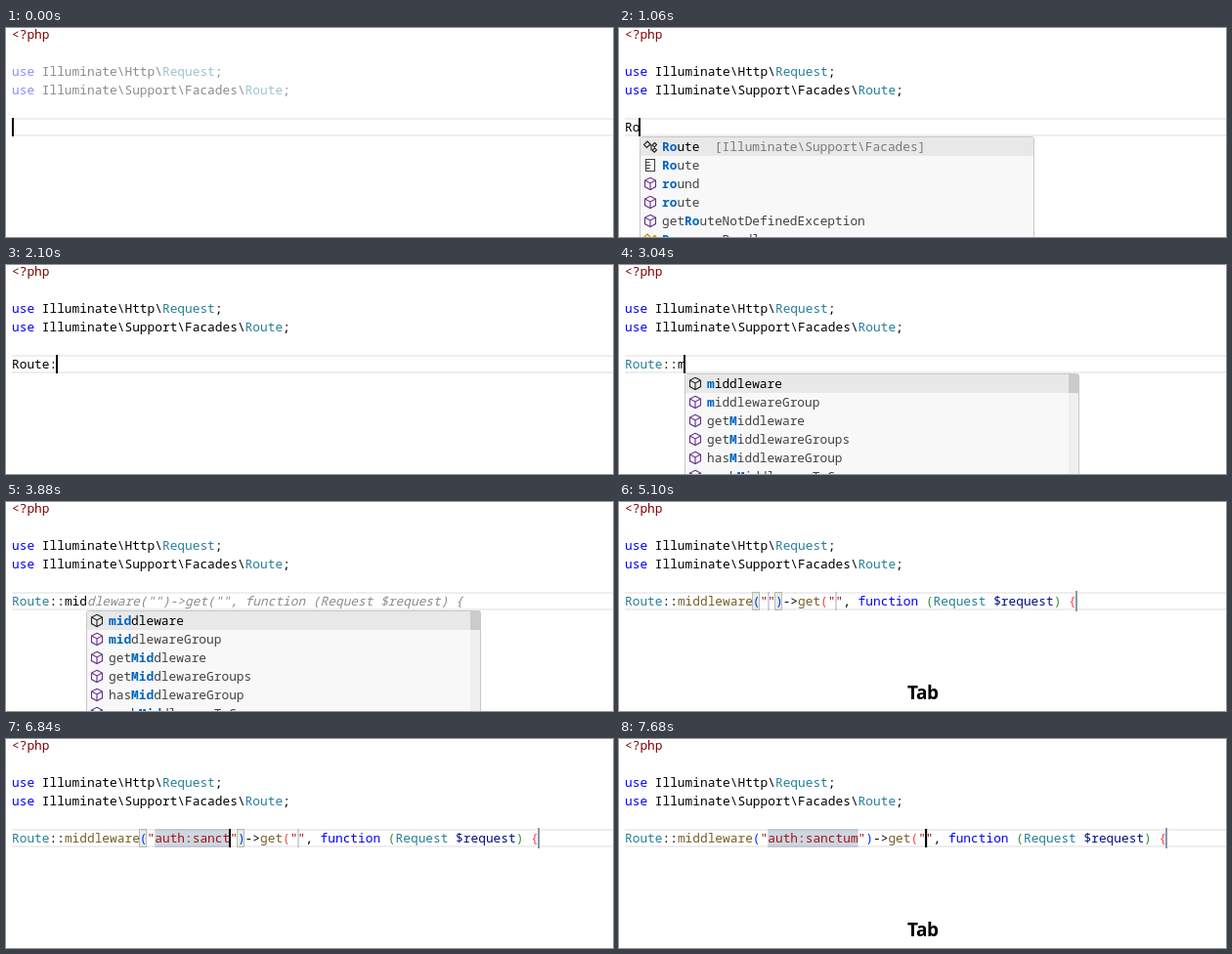
Animation of 621x214 px, one loop 8000 ms. Source, as an HTML page:

```html
<!DOCTYPE html>
<html lang="en">
<head>
<meta charset="utf-8">
<style>
html, body { margin: 0; width: 100%; height: 100%; overflow: hidden; background: #fff; }
svg { display: block; width: 621px; height: 214px; overflow: hidden; }
text { font: 12.83px "Noto Sans Mono", monospace; white-space: pre; }
.bold { font-weight: 700; }
.ghost { font-style: italic; }
.key { font: 700 19px "Open Sans", "Noto Sans", sans-serif; letter-spacing: -.5px; text-anchor: middle; }
</style>
</head>
<body>
<svg id="stage" viewBox="0 0 621 214"></svg>
<script>
const LOOP = 8000, LEFT = 6, CHAR = 7.697, ROW = 19, TOP = 92, BASE = 106;
const C = {
  plain: '#000', tag: '#800000', word: '#00f', type: '#267f99', call: '#795e26',
  str: '#a31515', name: '#001080', pair1: '#0431fa', pair2: '#319331', bad: '#ff4141',
  ghost: '#8c8c8c', item: '#424242', hit: '#0066bf', note: '#7a7a7a'
};
const stage = document.getElementById('stage');

// Typing timeline: [ms, text]
const head = [
  [0, ''], [900, 'R'], [1060, 'Ro'], [1160, 'Rou'], [1290, 'Rout'], [1420, 'Route'],
  [2100, 'Route:'], [2130, 'Route::'], [3040, 'Route::m'], [3200, 'Route::mi'],
  [3310, 'Route::mid'], [3980, 'Route::middleware']
];
const argTimes = [5490, 5560, 5640, 5860, 6090, 6250, 6350, 6510, 6640, 6840, 6910, 7090];
const blinks = [[230, 690], [1930, 2100], [2770, 3040], [3880, 4010], [4500, 4600], [5100, 5490], [7580, 7620]];
const ACCEPT = 4600, COLOUR = 4670, JUMP = 7620;
const tail = '("")->get("", function (Request $request) {';

const classItems = [
  ['class', 'Route', '[Illuminate\\Support\\Facades]'], ['unit', 'Route'], ['cube', 'round'],
  ['cube', 'route'], ['cube', 'getRouteNotDefinedException'], ['class', 'ResourceBundle']
];
const cubes = names => names.split(' ').map(n => ['cube', n]);
const anyItems = cubes('aliasMiddleware any apiResource apiResources apiSingleton auth');
const midItems = cubes('middleware middlewareGroup getMiddleware getMiddlewareGroups hasMiddlewareGroup pushMiddlewareToGroup');

const within = (t, spans) => spans.some(([a, b]) => t >= a && t < b);
const colX = col => LEFT + col * CHAR;
const caretX = col => LEFT + Math.max(0, Math.floor(col * CHAR - .75));
const rect = (x, y, w, h, fill, more = '') =>
  `<rect x="${x}" y="${y}" width="${w}" height="${h}" fill="${fill}" ${more}/>`;
const path = (d, color) => `<path d="${d}" fill="none" stroke="${color}" stroke-width="1.1"/>`;
const esc = s => s.replace(/&/g, '&amp;').replace(/</g, '&lt;');

// Each run is [colour, text, class]
function runs(x, y, list) {
  return list.map(([color, s, cls = '']) => {
    const out = s ? `<text x="${x.toFixed(2)}" y="${y}" fill="${C[color]}" class="${cls}">${esc(s)}</text>` : '';
    x += s.length * CHAR;
    return out;
  }).join('');
}

function icon(kind, x, y, selected) {
  const ink = selected ? '#222' : { cube: '#652d90', class: '#d67e00', unit: '#424242' }[kind];
  const shapes = {
    cube: `M${x} ${y - 6.2}l5.5 2.8v6.5l-5.5 3.1l-5.5 -3.1v-6.5zM${x - 5.5} ${y - 3.4}l5.5 2.8l5.5 -2.8M${x} ${y - .6}v6.8`,
    unit: `M${x - 4.5} ${y - 6}h9v12h-9zM${x - 4.5} ${y - 3}h4m-4 3h5m-5 3h4`,
    class: `M${x - 3} ${y - 5.5}l3 3l-3.5 3.5l-3 -3zM${x - 1} ${y - 1.5}h4M${x + 1} ${y - 1.5}v5h2M${x + 4.5} ${y - 4}l2 2l-2.3 2.3l-2 -2zM${x + 4.5} ${y + 1.4}l2 2l-2.3 2.3l-2 -2z`
  };
  return path(shapes[kind], ink);
}

function label(name, query) {
  let at = name.toLowerCase().indexOf(query.toLowerCase());
  let size = query.length;
  if (at < 0) { at = 0; size = 1; }
  return [['item', name.slice(0, at)], ['hit', name.slice(at, at + size), 'bold'], ['item', name.slice(at + size)]];
}

function popup(col, items, query, bar) {
  const x = Math.floor(colX(col)), y = 111;
  let out = rect(x + .5, y + .5, 403, 140, '#f8f8f8', 'stroke="#c8c8c8" rx="2"');
  out += rect(x + 1, y + 1, 402, ROW, '#e8e8e8');
  if (bar) out += rect(x + 393, y + 1, 10, 120, '#efefef') + rect(x + 393, y + 1, 10, ROW, '#cbcbcb');
  items.forEach(([kind, name, note], i) => {
    const list = label(name, query);
    if (!i) list.forEach(r => { if (r[0] === 'item') r[0] = 'plain'; });
    if (note) list.push(['note', '  ' + note]);
    out += icon(kind, x + 11, y + 10.5 + i * ROW, !i) + runs(x + 23, 126 + i * ROW, list);
  });
  return out;
}

function suggestions(t, text) {
  const col = text.length;
  if (t >= 970 && t < 2100) {
    const items = col < 4 ? classItems : classItems.filter(i => i[1] !== 'round');
    return popup(col, items, text, false);
  }
  if (t < 2260 || t >= 3980) return '';
  const query = text.slice(7);
  return popup(col, query ? midItems : anyItems, query, true);
}

function header(t) {
  const use = (ns, name, y) => runs(LEFT, y, [['word', 'use '], ['plain', 'Illuminate\\' + ns + '\\'], ['type', name], ['plain', ';']]);
  return runs(LEFT, 11, [['tag', '<?php']]) +
    `<g opacity="${t < 970 ? .45 : 1}">${use('Http', 'Request', 49)}${use('Support\\Facades', 'Route', 68)}</g>`;
}

function codeRuns(t, text, arg) {
  const method = text.slice(7);
  if (t < 2260) return [['plain', text]];
  const list = [['type', 'Route'], ['plain', '::']];
  if (t < ACCEPT) {
    list.push(['plain', method]);
    if (t >= 3370) list.push(['ghost', ('middleware' + tail).slice(method.length), 'ghost']);
    return list;
  }
  if (t < COLOUR) return [...list, ['plain', method + tail]];
  return [...list,
    ['call', method], ['pair1', '('], ['str', `"${arg}"`], ['pair1', ')'], ['plain', '->'],
    ['call', 'get'], ['bad', '('], ['str', '""'], ['plain', ', '], ['word', 'function '],
    ['pair2', '('], ['type', 'Request'], ['plain', ' '], ['name', '$request'],
    ['pair2', ')'], ['plain', ' '], ['bad', '{']];
}

function tabStops(t, n) {
  const tint = 'rgba(10,50,100,.2)';
  const stop = (col, len) => rect(len ? colX(col) : caretX(col) + 1, TOP, Math.max(2, len * CHAR), ROW, tint);
  const pair = col => rect(Math.floor(colX(col)) + .5, TOP + .5, 7, ROW - 1, 'rgba(0,100,0,.1)', 'stroke="#b9b9b9"');
  let out = stop(19, n) + stop(28 + n, 0);
  if (t < JUMP) out += pair(17) + pair(20 + n);
  return out + rect(caretX(60 + n), 91, 2, 21, '#8498b1');
}

function view(t) {
  const text = head.filter(k => k[0] <= t).pop()[1];
  const arg = 'auth:sanctum'.slice(0, argTimes.filter(k => k <= t).length);
  const n = arg.length;
  const col = t < ACCEPT ? text.length : t < JUMP ? 19 + n : 28 + n;
  let out = rect(LEFT, TOP, 615, 2, '#eee') + rect(LEFT, 109, 615, 2, '#eee') + header(t);
  if (t >= ACCEPT) out += tabStops(t, n);
  out += runs(LEFT, BASE, codeRuns(t, text, arg));
  if (!within(t, blinks)) out += rect(caretX(col), TOP, 2, ROW, '#000');
  out += suggestions(t, text);
  if (within(t, [[3980, 5400], [JUMP, LOOP]])) out += '<text class="key" x="310.8" y="201.5">Tab</text>';
  return out;
}

let shown = '', start = performance.now();
function tick(now) {
  const next = view(Math.max(0, now - start) % LOOP);
  if (next !== shown) stage.innerHTML = shown = next;
  requestAnimationFrame(tick);
}
tick(start);
</script>
</body>
</html>
```
